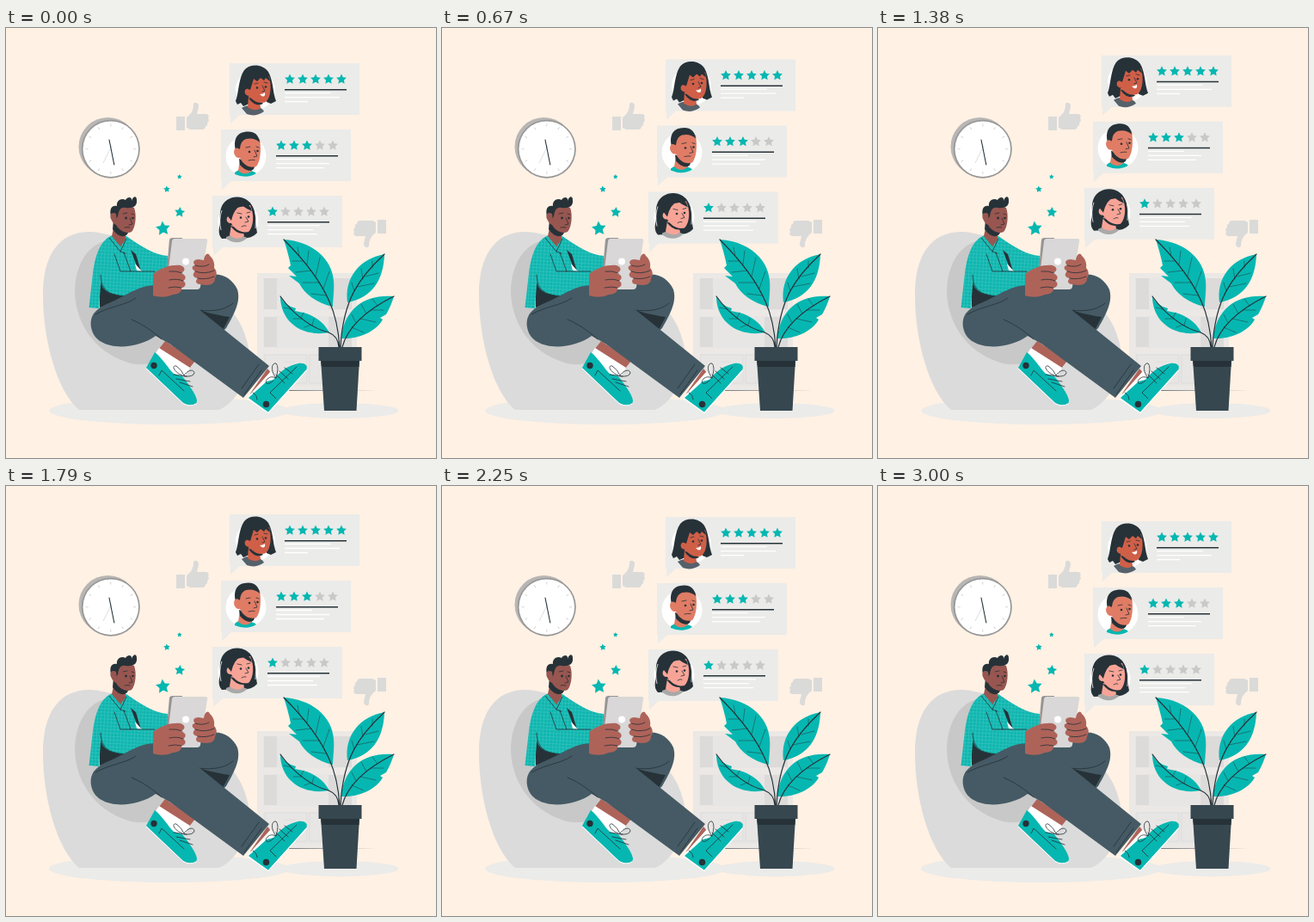
An HTML page that plays this animation: 500x500 px, repeating every 3040 ms.

```html
<!DOCTYPE html>
<html lang="en">
<head>
<meta charset="utf-8">
<title>Reviews</title>
<style>
html,body{margin:0;width:100%;height:100%;overflow:hidden;background:#fff1e4}
svg{display:block;width:100vw;height:100vh}
.ink{fill:#263238}
.teal{fill:#06b7b1}
.pants{fill:#455a64}
.skin{fill:#ae6359}
.face{fill:#985650}
.line{fill:none;stroke:#263238;stroke-linecap:round;stroke-linejoin:round}
.thin{stroke-width:.8}
</style>
</head>
<body>
<svg viewBox="0 0 500 500">
<defs>
  <pattern id="check" width="4" height="4" patternUnits="userSpaceOnUse" patternTransform="rotate(3)">
    <rect width="4" height="4" fill="#0eb6af"/>
    <path d="M0 .5H4M.5 0V4" stroke="#45c7c0" stroke-width=".5"/>
  </pattern>
</defs>

<g id="floor" fill="#ebebe9">
  <ellipse cx="190" cy="445" rx="140" ry="16"/>
  <ellipse cx="388" cy="445" rx="68.500" ry="9"/>
</g>

<g id="shelf">
  <path fill="#ebe8e5" d="M292 285H408V422H292Z"/>
  <path fill="#e8e6e4" d="M299 291H402V328H299ZM299 335H402V372H299ZM299 379H402V416H299Z"/>
  <path fill="#dcdbda" d="M300 291H315V327H300ZM300 336H315V371H300ZM375 291H402V327H375ZM375 336H402V371H375Z"/>
  <path fill="none" stroke="#dedddb" d="M301 380H350V413H301ZM353 380H401V413H353ZM324 388H336"/>
  <path class="ink" d="M300 421.300L432 421.800L300 422.100Z"/>
</g>

<g id="clock">
  <circle cx="118.500" cy="138" r="34" fill="#b8b6b4"/>
  <circle cx="121.800" cy="140.700" r="34" fill="#969696"/>
  <circle cx="121.800" cy="140.700" r="32.300" fill="#fff"/>
  <g id="ticks" stroke="#c9c9c9" stroke-width=".8"></g>
  <path d="M123 137L113 157" stroke="#c7c7c7" stroke-width=".6"/>
  <path class="line" stroke-width="1.100" d="M120 130L125.800 159"/>
</g>

<g id="thumbs" fill="#dadad9">
  <path id="thumb" d="M198 103H208V119H198ZM210 104C214 101 218 97 218 89C218 86 223 86 224 90C224 94 222 98 222 100H233Q237 101 235 105Q237 108 234 110Q235 114 232 114Q232 118 228 118H214L210 116Z"/>
  <use href="#thumb" transform="rotate(180 320 171)"/>
</g>

<g id="cards"></g>
<g id="sparks" class="teal"></g>

<g id="beanbag">
  <path fill="#dbdbdb" d="M85 444C60 423 43 365 43 310C43 265 61 237 97 237C124 238 145 250 165 262C220 288 262 320 274 347C285 372 286 393 278 408C270 429 257 441 247 444Z"/>
  <path fill="#c8c8c8" d="M119 247C94 251 80 277 80 308C82 347 105 376 139 388C158 395 175 390 190 380L190 290Z"/>
</g>

<g id="torso">
  <path class="ink" d="M109 286L130 299L167 303L160 309L109 325Z"/>
  <path fill="url(#check)" d="M124 241C110 246 104 263 101 285L96.500 325L108 326L111 286L132 310L150 307L158 283L190 287L188 265C173 264 159 255 140 242Z"/>
  <path class="ink" d="M145 258L154 282L157 283L151 263Z"/>
  <path fill="#fff" d="M150 274L158 283L152 282Z"/>
  <path fill="url(#check)" d="M117 260C108 267 107 281 110 295C114 312 132 313 171 312L173 283L133 283L126 265Z"/>
  <path class="line thin" d="M110 287C111 312 126 313 171 312M126 263L133 283L173 283M137 261L145 283M120 244L133 260L140 245M133 260L139 262"/>
</g>

<g id="head">
  <path class="face" d="M126 228L123 242L133 254L139 246L139 236Z"/>
  <path class="ink" d="M125 223L124 234C129 241 135 244 140 241L145 234L132 230Z"/>
  <path class="face" d="M126 213C133 205 143 206 149 209C152 217 151 231 146 237C140 240 132 236 128 229C122 226 120 219 126 213Z"/>
  <path class="ink" d="M122 219C120 210 123 206 129 207C128 201 134 197 139 200C142 195 147 197 146 201C148 195 152 195 152 200C153 208 146 210 139 209C133 208 131 212 130 219L127 224Z"/>
  <path class="face" d="M128 216C123 213 120 217 122 222Q125 227 129 224Z"/>
  <path class="line thin" d="M136 216L141 215M146 216L149 217M144 221L147 228L143 229M138 232Q141 231 144 232"/>
  <circle class="ink" cx="139.500" cy="221" r="1.400"/><circle class="ink" cx="147.500" cy="221" r="1.300"/>
</g>

<g id="crossed-leg">
  <path class="skin" d="M185 364L178 373L213 396L220 387Z"/>
  <path class="pants" d="M160 303C190 309 214 300 231 289C247 282 263 290 269 304C273 317 267 330 256 349L238 366L190 367Z"/>
  <path class="ink" d="M213 323C228 330 245 334 260 336L252 351Z"/>
  <path class="line thin" d="M215 327C236 330 252 330 264 320"/>
  <path fill="#fff" d="M178 372L172 381L197 405L208 405L214 395Z"/>
  <path class="teal" d="M173 377L163 395L206 436C213 440 222 440 222 433C221 426 213 415 205 405L195 402C188 395 182 384 173 377Z"/>
  <path fill="none" stroke="#fff" d="M163 396L206 436.500Q214 441 221 437"/>
  <circle class="ink" cx="172" cy="392.500" r="3.700"/>
  <path class="line thin" d="M178 404L181 398L207 422M195 403L210 405M198 408L214 411M202 412L217 417M205 404C195 400 192 392 198 393Q204 397 207 404C211 398 218 396 219 401Q218 406 207 405"/>
</g>

<g id="front-leg">
  <path class="skin" d="M284 425L304 396L309 402L289 432Z"/>
  <path fill="#fff" d="M281 429L288 434L313 405L308 399Z"/>
  <path class="pants" d="M99 348C97 331 107 325 126 317C144 308 157 299 174 299C195 298 207 311 218 322L306 393L276 430L190 367L174 358C151 375 104 377 99 348Z"/>
  <path class="line thin" d="M146 339C158 344 170 352 181 362M104 333C122 323 138 323 151 314M294 391L274 419M297 398L277 426"/>
  <path class="teal" d="M282 430L305 447L349 398C352 392 347 389 340 390C327 393 320 398 311 409L303 411Z"/>
  <path fill="none" stroke="#fff" stroke-width="1.200" d="M281 431L305 447.500L349.500 398"/>
  <circle class="ink" cx="302.500" cy="437.500" r="3.800"/>
  <path class="line thin" d="M287 424Q292 427 292 432M314 431L307 424L338 394M314 403L324 413M318 399L328 408M324 395L333 402M311 410C303 417 300 412 304 408Q308 404 314 407C307 398 309 389 314 390Q318 394 314 407"/>
</g>

<g id="tablet">
  <path fill="#959595" d="M190 246Q191 244 193 244H205L195 303H185Z"/>
  <path fill="#d9d7d7" d="M193 248Q193.500 245 196 245H232Q235 245 234 248L226 301Q225.500 304 222 304H186Z"/>
  <circle cx="209" cy="271.500" r="4" fill="#fff"/>
  <path class="skin" d="M171 286C181 278 193 275 203 276C209 278 209 283 203 285C210 287 210 292 206 294C211 297 208 302 204 302C205 306 201 310 194 310C185 314 177 313 171 311Z"/>
  <path class="skin" d="M230 270C231 263 235 260 237 265C241 268 243 274 242 279C246 283 245 288 243 291C243 299 235 300 226 298C220 298 220 293 223 291C216 290 217 285 220 283C215 280 216 276 220 276C216 272 219 269 224 269Z"/>
  <path class="line thin" d="M190 283Q198 282 205 285M190 293Q199 291 206 294M189 302Q197 300 204 302M220 276Q229 279 236 275M220 283Q231 287 242 282M223 291Q233 293 242 289"/>
</g>

<g id="plant">
  <path class="teal" d="M323 246C356 248 379 268 381 294C382 306 380 316 380 324C361 320 347 309 341 297L329 288L338 289L328 279L331 276C329 266 326 255 323 246Z"/>
  <path class="teal" d="M440 263C411 268 393 291 397 319C424 314 439 295 440 263Z"/>
  <path class="teal" d="M451 312C419 309 393 325 390 361C415 362 432 350 438 339L435 337L442 333C446 326 449 319 451 312Z"/>
  <path class="teal" d="M319 312C319 342 345 360 376 354C369 341 357 334 346 331L336 329L337 326C329 324 322 319 319 312Z"/>
  <path class="line" stroke-width="1.200" d="M323 246C348 271 366 295 376 318Q386 340 388 372M440 263C411 290 392 315 389 371M451 312C423 326 398 345 391 371M319 312C337 337 359 350 375 354Q386 358 387 371"/>
  <path class="line" stroke-width=".5" d="M341 265L339 255M350 275L352 259M360 289L365 267M369 303L376 283M346 271L333 271M355 282L337 284M365 296L345 296M372 311L355 309M426 279L426 271M415 292L413 280M405 306L402 296M418 289L433 285M408 301L428 297M432 323L426 315M419 332L413 321M407 343L402 333M424 328L439 328M412 338L430 342M402 348L416 354M332 327L323 325M344 338L334 338M355 345L347 348M343 337L346 331M356 346L358 338"/>
  <path fill="#37474f" d="M366 385H411L407.500 445H370Z"/>
  <path class="ink" d="M366 386H411L410.500 394H367Z"/>
  <path fill="#37474f" d="M363.500 371H413.500V387H363.500Z"/>
</g>
</svg>

<script>
const PERIOD = 3040, RISE = 1500, LIFT = 10;
const TEAL = '#06b7b1', GREY = '#c9c9c9';
const byId = id => document.getElementById(id);

function star(x, y, r, fill = TEAL, turn = 0) {
  const points = Array.from({length: 10}, (_, i) => {
    const a = (i * 36 - 90 + turn) * Math.PI / 180;
    const d = i % 2 ? r * .5 : r;
    return (x + d * Math.cos(a)).toFixed(2) + ',' + (y + d * Math.sin(a)).toFixed(2);
  });
  return `<polygon points="${points.join(' ')}" fill="${fill}"/>`;
}

// Portraits use coordinates relative to the card's top left corner.
const bobWoman = `
  <circle cx="30" cy="31" r="23" fill="#fff"/>
  <path class="ink" d="M17 8C24 0 39 1 45 10C51 20 50 34 54 44L48 47L43 45L42 25L24 25L23 47L16 50L13 46L9 48L7 44C11 34 10 18 17 8Z"/>
  <path fill="#56616a" d="M14 52Q21 47 28 50Q38 51 40 56Q30 63 20 59Z"/>
  <path fill="#d05f48" d="M22 38L21 51Q29 57 36 52L35 43Z"/>
  <path class="ink" d="M22 40C27 48 33 50 39 47L34 42Z"/>
  <path fill="#d05f48" d="M22 19L46 15C49 27 48 40 42 45C35 48 27 44 23 38C16 38 16 29 22 29Z"/>
  <path class="ink" d="M19 29Q18 10 32 7Q45 8 47 21L42 17L40 20L36 17L32 21L28 18L24 31Z"/>
  <path class="line thin" d="M29 24L33 23M40 22L44 23M38 26L41 32L38 33"/>
  <circle class="ink" cx="32" cy="28.500" r="1.300"/><circle class="ink" cx="42" cy="27.500" r="1.300"/>
  <path d="M35 36Q39 36 41 34Q42 39 38 38.500Z" fill="#fff"/>`;

const shortHairMan = `
  <circle cx="29" cy="31" r="23.500" fill="#fff"/>
  <path class="teal" d="M16 50Q21 45 27 48Q37 47 41 51Q30 58 16 52Z"/>
  <path fill="#e07c65" d="M22 35L20 48Q28 55 36 48L35 40Z"/>
  <path class="ink" d="M21 34L22 41C27 47 34 50 38 46L40 41Z"/>
  <path fill="#e07c65" d="M20 14Q32 6 45 11C47 24 46 37 41 43C33 46 25 40 22 33C15 34 13 23 18 22Z"/>
  <path class="ink" d="M17 24C14 13 18 4 27 3C37 1 44 5 45 15Q39 9 29 11Q23 13 22 22L19 29Z"/>
  <path fill="#e07c65" d="M22 23C17 19 14 23 16 29Q19 34 23 31Z"/>
  <path class="line thin" d="M29 21L34 20M41 20L44 21M39 24L42 31L38 32M32 36Q36 35 39 35.500"/>
  <circle class="ink" cx="33" cy="26" r="1.300"/><circle class="ink" cx="42.500" cy="25" r="1.300"/>`;

const longHairWoman = `
  <circle cx="30" cy="29" r="23.500" fill="#fff"/>
  <path class="ink" d="M17 5C28 -2 42 2 47 13C52 22 50 34 52 43C46 50 37 50 29 49L11 50C5 43 9 37 9 28C8 18 10 10 17 5Z"/>
  <path fill="#a9a9a9" d="M16 48Q25 43 41 49Q29 59 16 50Z"/>
  <path fill="#f7a497" d="M22 34L20 46Q29 53 37 47L35 39Z"/>
  <path class="ink" d="M21 35Q28 45 37 44L34 38Z"/>
  <path fill="#f7a497" d="M22 15L44 11C49 22 48 36 42 42C33 44 25 38 22 32C15 33 15 22 21 24Z"/>
  <path class="ink" d="M18 24Q19 7 33 7Q44 8 46 18Q39 15 34 11Q25 15 22 29Z"/>
  <path class="line thin" d="M29 20L34 21M40 20L44 19M39 25L42 30L38 31M34 36Q37 34 39 35"/>
  <circle class="ink" cx="33" cy="25.500" r="1.300"/><circle class="ink" cx="42" cy="24.500" r="1.300"/>
  <path d="M11 17Q7 28 10 40M49 14Q52 27 50 38" fill="none" stroke="#fff" stroke-width=".8"/>`;

function card({x, y, score, text, portrait}) {
  const stars = [0, 1, 2, 3, 4]
    .map(i => star(70 + i * 15, 18.7, 6.2, i < score ? TEAL : GREY)).join('');
  const lines = text.map((w, i) => `<path d="M64 ${34.6 + i * 5}h${w}"/>`).join('');
  return `<g transform="translate(${x} ${y})">
    <path fill="#ebebe9" d="M0 0H151V60H12L1 70V60H0Z"/>
    ${portrait}${stars}
    <path d="M64 30.800h72" stroke="#263238" stroke-width="1.500"/>
    <g stroke="#fff" stroke-width="1.400">${lines}</g></g>`;
}

byId('cards').innerHTML = [
  {x: 260, y: 41, score: 5, text: [54, 64, 27], portrait: bobWoman},
  {x: 250, y: 118, score: 3, text: [42, 62, 56], portrait: shortHairMan},
  {x: 240, y: 195, score: 1, text: [61, 53, 58], portrait: longHairWoman}
].map(card).join('');

byId('sparks').innerHTML =
  star(182.5, 233.2, 8.7, TEAL, -5) + star(202, 214.3, 6.3, TEAL, 5) +
  star(187, 187.5, 4, TEAL, -5) + star(201.7, 173, 3, TEAL, 5);

byId('ticks').innerHTML = Array.from({length: 12}, (_, i) =>
  `<path d="M121.800 111.500v3" transform="rotate(${i * 30} 121.800 140.700)"/>`).join('');

function draw(now) {
  const t = now % PERIOD;
  const rise = Math.max(0, 1 - Math.abs(t - RISE) / RISE);
  byId('cards').setAttribute('transform', `translate(0 ${-LIFT * rise})`);
  requestAnimationFrame(draw);
}
draw(0);
</script>
</body>
</html>
```
